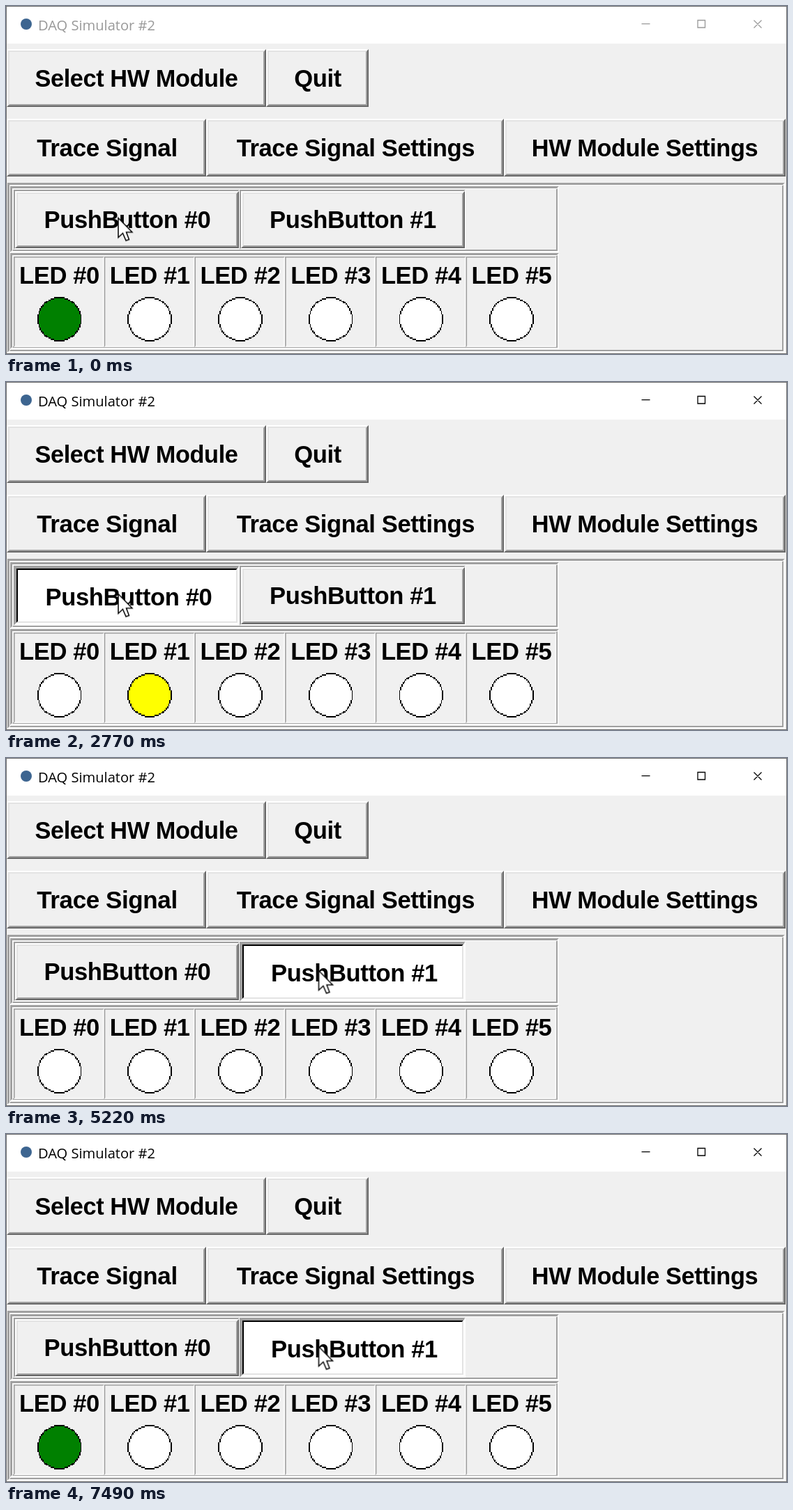
An HTML page that plays this animation: 1120 px wide and 500 px high, repeating every 8000 ms.

```html
<!DOCTYPE html>
<html lang="en">
<head>
<meta charset="utf-8">
<title>DAQ Simulator</title>
<style>
html, body { margin: 0; width: 100%; height: 100%; overflow: hidden; background: #f0f0f0; }
svg { display: block; width: 1120px; height: 500px; }
text { font: bold 34.6px "Liberation Sans", Arial, sans-serif; letter-spacing: -.4px; text-anchor: middle; fill: #000; }
#title { font: 20.1px "Open Sans", "Noto Sans", sans-serif; letter-spacing: 0; text-anchor: start; }
.led { fill: #fff; }

/* One loop is 8 s, so 1% is 80 ms; every change is a hard step. */
.led, .press, #bar, #cursor { animation: 8s step-end infinite; }
#bar { color: #999; animation-name: focus; }
#bar text { fill: currentColor; }
#cursor { animation-name: move; }
.press { visibility: hidden; }
#press0 { animation-name: press0; }
#press1 { animation-name: press1; }
#led0 { animation-name: led0; }
#led1 { animation-name: led1; }
#led2 { animation-name: led2; }
#led3 { animation-name: led3; }
#led4 { animation-name: led4; }
#led5 { animation-name: led5; }

@keyframes focus { 0% { color: #999; } 6.25%, 100% { color: #000; } }
@keyframes press0 {
  0%, 43.75%, 100% { visibility: hidden; }
  6.25% { visibility: visible; }
}
@keyframes press1 {
  0% { visibility: hidden; }
  58.25%, 100% { visibility: visible; }
}
@keyframes move {
  0% { transform: translate(161px, 304.5px); }
  50.875% { transform: translate(254px, 303.5px); }
  51.75% { transform: translate(345px, 281px); }
  52.5% { transform: translate(417px, 281px); }
  53.375% { transform: translate(447px, 285.5px); }
  55.25% { transform: translate(449px, 298px); }
  56%, 100% { transform: translate(448.5px, 305.5px); }
}
@keyframes led0 {
  0%, 42.125%, 93.625%, 100% { fill: var(--on); }
  10%, 58.25% { fill: #fff; }
}
@keyframes led1 {
  0%, 42.125%, 65.25%, 100% { fill: #fff; }
  34.625%, 58.25% { fill: var(--on); }
}
@keyframes led2 {
  0%, 34.625%, 72.5%, 100% { fill: #fff; }
  28.125%, 67.125% { fill: var(--on); }
}
@keyframes led3 {
  0%, 28.125%, 79.875%, 100% { fill: #fff; }
  21.125%, 72.5% { fill: var(--on); }
}
@keyframes led4 {
  0%, 21.125%, 86.125%, 100% { fill: #fff; }
  14.125%, 79.875% { fill: var(--on); }
}
@keyframes led5 {
  0%, 14.125%, 92.75%, 100% { fill: #fff; }
  10%, 87% { fill: var(--on); }
}
</style>
</head>
<body>
<svg id="stage" viewBox="0 0 1120 500"></svg>
<script>
const FACE = '#f0f0f0', LIGHT = '#e3e3e3', GRAY = '#a0a0a0', DARK = '#696969', WHITE = '#fff';
const PIXEL = 60 / 34;

const rect = (x, y, w, h, fill) =>
  `<rect x="${x}" y="${y}" width="${w}" height="${h}" fill="${fill}"/>`;

const label = (x, y, str, size = 34.6) =>
  `<text x="${x}" y="${y}" style="font-size:${size}px">${str}</text>`;

// Top-left and bottom-right edges of a box, t pixels thick.
const bevel = (x, y, w, h, tl, br, t = 2) =>
  `<path fill="${tl}" d="M${x} ${y}h${w}l${-t} ${t}h${2 * t - w}v${h - 2 * t}l${-t} ${t}z"/>` +
  `<path fill="${br}" d="M${x + w} ${y + h}h${-w}l${t} ${-t}h${w - 2 * t}v${2 * t - h}l${t} ${-t}z"/>`;

const double = (x, y, w, h, tl, br, tl2, br2) =>
  bevel(x, y, w, h, tl, br) + bevel(x + 2, y + 2, w - 4, h - 4, tl2, br2);

// Sunken panel: heavy gray at the top left, thin gray and white at the bottom right.
const panel = (x, y, w, h) =>
  bevel(x + 2, y + 2, w - 4, h - 4, WHITE, GRAY) + bevel(x, y, w, h, GRAY, WHITE, 3) +
  bevel(x + 3, y + 3, w - 5, h - 5, WHITE, GRAY, 1);

const button = (x, y, w, h, cx, base, str, size) =>
  rect(x, y, w, h, FACE) + double(x, y, w, h, WHITE, DARK, LIGHT, GRAY) +
  label(cx, base, str, size);

// Staircase outline of a disc, r coarse pixels in radius.
function disc(r) {
  let d = '';
  for (let y = -r; y < r; y++) {
    const half = Math.round(Math.sqrt(r * r - (y + 0.5) ** 2));
    d += `M${-half} ${y}h${2 * half}v1h${-2 * half}z`;
  }
  return d;
}

function pushButton(i) {
  const x = 13 + 324 * i, cx = 174 + 323.5 * i, str = 'PushButton #' + i;
  return bevel(x - 2, 264, 324, 86, GRAY, WHITE) +
    button(x, 266, 321, 82, cx, 318.5, str) +
    `<g class="press" id="press${i}">` + rect(x, 266, 321, 82, WHITE) +
    double(x, 266, 321, 82, GRAY, WHITE, '#000', LIGHT) +
    label(cx + 2, 320.5, str) + '</g>';
}

function led(i) {
  const x = 129.7 * i, color = ['#008000', '#ffff00', '#ff0000'][i % 3];
  return bevel(11 + x, 360, 129.7, 130, GRAY, WHITE, 1.6) +
    label(76.5 + x, 399, 'LED #' + i) +
    `<g transform="translate(${76.5 + x} 450) scale(${PIXEL})" shape-rendering="crispEdges">` +
    `<path d="${disc(18)}"/><path class="led" id="led${i}" style="--on:${color}" d="${disc(17)}"/></g>`;
}

const titleBar = rect(0, 0, 1120, 54, WHITE) +
  '<circle cx="29" cy="26" r="8" fill="#3d6590"/>' +
  '<g id="bar"><text id="title" x="46" y="35">DAQ Simulator #2</text>' +
  '<path fill="none" stroke="currentColor" stroke-width="1.3" ' +
  'd="M911.5 25.7h12M992 20.5h10.5v10.5h-10.5zM1072.5 20.5l11 11m0-11l-11 11"/></g>';

document.getElementById('stage').innerHTML =
  rect(0, 0, 1120, 500, FACE) + titleBar +
  button(1, 62, 372, 83, 187, 115.5, 'Select HW Module', 34.3) +
  button(373, 62, 147, 83, 447, 115.5, 'Quit') +
  button(1, 162, 286, 83, 145, 215.5, 'Trace Signal', 35) +
  button(287, 162, 427, 83, 501.3, 215.5, 'Trace Signal Settings') +
  button(714, 162, 404, 83, 916, 215.5, 'HW Module Settings', 34.3) +
  panel(2, 254, 1115, 244) +
  panel(6, 259, 787, 95) +
  panel(6, 355, 787, 138) +
  [0, 1].map(pushButton).join('') +
  [0, 1, 2, 3, 4, 5].map(led).join('') +
  '<rect x=".5" y=".5" width="1119" height="499" fill="none" stroke="#707070"/>' +
  '<path id="cursor" fill="#fff" stroke="#000" stroke-width="1.5" ' +
  'd="M0 0V28L6.5 22 11 32.5 15.5 31 11.5 20.5H20Z"/>';
</script>
</body>
</html>
```
